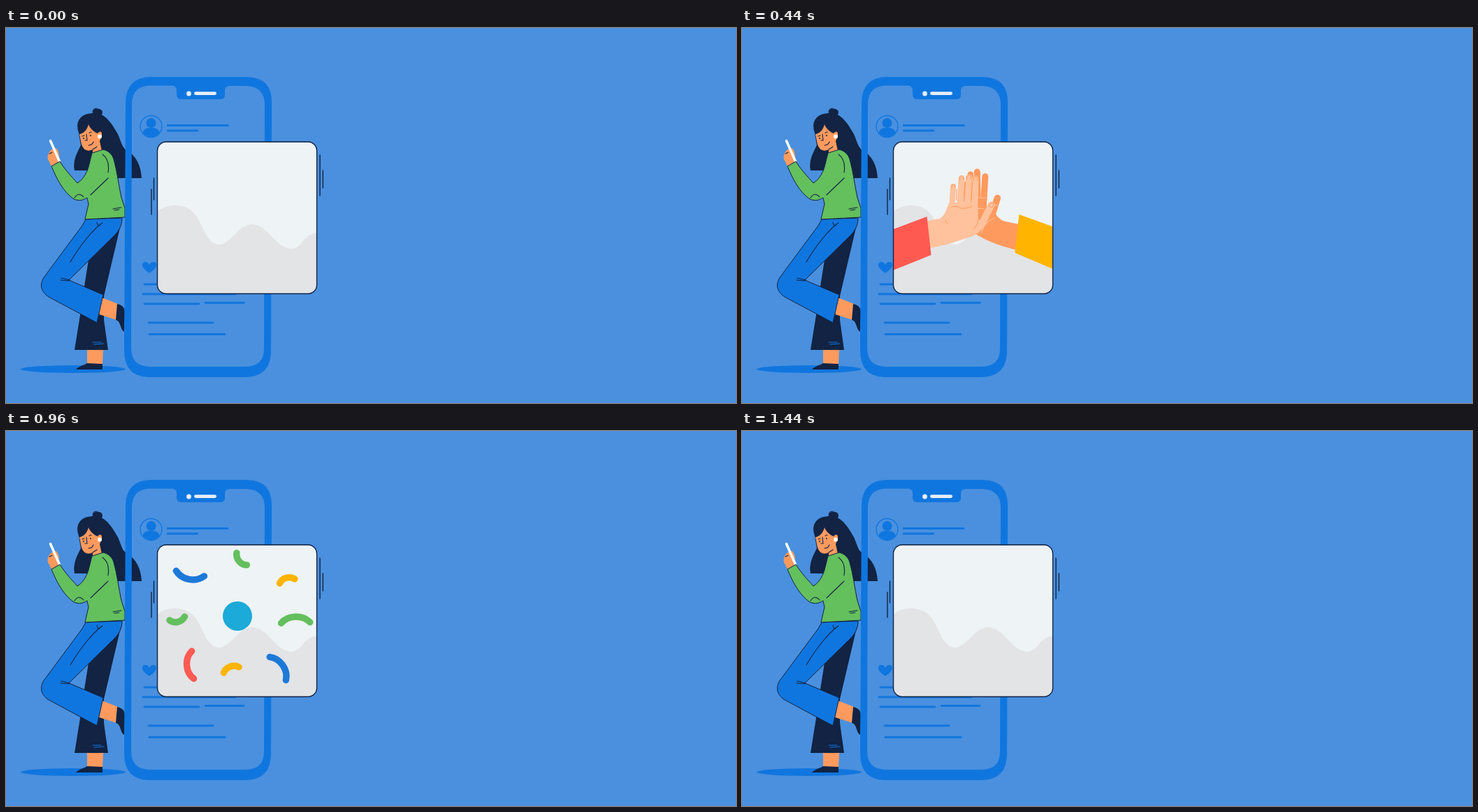
An HTML page that plays this animation: 1044x537 px, repeating every 1680 ms.

```html
<!DOCTYPE html>
<html lang="en">
<head>
<meta charset="utf-8">
<title>High five</title>
<style>
  html, body { margin: 0; height: 100%; overflow: hidden; background: #4a90de; }
  svg { display: block; }
  .navy { fill: #122343; }
  .blue { fill: #1076df; }
  .skin { fill: #ff9a5e; }
  .green { fill: #64bf5d; }
  .edge { stroke: #122343; stroke-width: 1; stroke-linejoin: round; }
  .line { fill: none; stroke: #122343; stroke-width: 1.1; stroke-linecap: round; }
  .text { fill: none; stroke: #1076df; stroke-width: 2.8; stroke-linecap: round; }
  .hand path, #confetti path { stroke-linecap: round; }
</style>
</head>
<body>
<svg width="1044" height="537" viewBox="0 0 1044 537">
  <defs>
    <clipPath id="inside"><rect x="217" y="163.5" width="227" height="217" rx="12"/></clipPath>
  </defs>

  <!-- woman -->
  <ellipse class="blue" cx="96" cy="488.5" rx="75" ry="5.5"/>
  <path class="navy" d="M104 150C98 132 108 122 126 122C142 121 152 138 160 152C165 163 165 169 172 175C187 183 193 198 194 215H155L150 204H98C95 190 102 178 107 168Z"/>
  <ellipse class="navy" cx="131" cy="121" rx="7" ry="5.500"/>
  <path class="line" d="M124 120Q125 115 130 115"/>
  <path class="skin" d="M105 152C107 160 107 166 110 171C114 177 120 176 124 174L124 180L137 176L134 162L137 154C138 148 134 147 131 151C126 149 120 144 118 138C116 146 111 151 105 152Z"/>
  <circle cx="134" cy="155.500" r="3" fill="#fff"/>
  <path class="line" d="M115 152L116 161L113 161M118 168Q123 168 125 163M109 155L112 154M119 150L122 149M124 174L130 170"/>
  <circle class="navy" cx="111" cy="158" r="1"/><circle class="navy" cx="121" cy="154" r="1"/>

  <path class="skin" d="M69 172C63 174 58 181 60 188L65 198L76 191C75 185 77 180 74 175C73 172 71 172 69 172Z"/>
  <path d="M63.500 161.500L76.500 191" stroke="#fff" stroke-width="3.500" stroke-linecap="round"/>
  <path class="line" d="M62 180L66 178"/>

  <path class="navy" d="M118 332L163 286L140 384V418L146 461H98L107 405L112 370Z"/>
  <path class="line" d="M124 450L136 450M126 453L140 452" style="stroke:#1076df"/>
  <path class="skin" d="M137 386L160 395L158 418L133 410ZM116 461H139L138 481H116Z"/>
  <path class="navy" d="M159 395C166 397 171 400 170 410L169 435C163 432 165 420 157 418ZM100 489C104 484 112 483 116 480L138 481V489Z"/>
  <path class="blue edge" d="M114 274L166 272C166 284 161 292 150 302L90 361L139 382L130 422L61 385C50 378 47 367 55 356L109 283Z"/>
  <path class="line" d="M138 279C127 286 108 308 92 335M130 278Q131 284 134 283M78 361L90 362M79 358L91 361"/>

  <path class="green edge" d="M123 179L139 174C147 176 152 181 154 188C159 205 161 225 165 243L170 258V271L113 274L118 252L116 243C110 247 104 248 97 245C82 235 72 215 65 198L77 191C85 204 94 213 102 222C111 217 117 205 119 195Z"/>
  <path class="line" d="M138 181C145 186 148 194 146 207M146 215L121 239M98 243Q104 234 111 242M153 259L165 257M155 261L162 260"/>

  <!-- phone -->
  <path class="blue" fill-rule="evenodd" d="M208 70H345Q380 71 380 106L379 464Q378 500 341 500H204Q169 499 169 462L171 106Q172 70 208 70ZM206 82.500Q180 83 180 110L179 458Q179 485 206 485H342Q369 485 369 459L370 110Q370 84 344 83H320Q313 83 313 90V96Q313 102 306 102H251Q244 102 244 95V89Q244 83 237 82.500Z"/>
  <g fill="#e6eef6">
    <circle cx="261.500" cy="94" r="3.400"/><rect x="269" y="91.300" width="32" height="4.600" rx="2.300"/>
  </g>
  <circle cx="207.500" cy="141" r="15.500" fill="none" stroke="#1076df" stroke-width="1.300"/>
  <circle class="blue" cx="207.500" cy="136" r="7"/>
  <path class="blue" d="M195 150Q197 144 204 143H211Q218 144 220 150Q208 162 195 150Z"/>
  <path class="blue" d="M205 351C191 342 194 335 199 335Q203 335 205 339Q207 335 211 335C216 335 219 342 205 351Z"/>
  <path class="text" d="M231 139.500H317M231 147H274M198 367H218M196 381H328M198 395H276M285 393.500H340M204 422H296M205 438.500H313"/>
  <path class="line" style="stroke-width:1.400" d="M449 182V240M453.300 204V229M208 231V267M211.500 215V246"/>

  <!-- card -->
  <g clip-path="url(#inside)">
    <rect x="216" y="163" width="229" height="218" fill="#eef3f5"/>
    <path fill="#e2e4e6" d="M216 263C225 256 233 254 242 254C256 254 268 261 275 274C284 291 290 310 305 310C322 310 332 281 352 281C374 281 386 316 408 316C425 316 424 294 445 294V381H216Z"/>
    <circle id="badge" r="21" fill="#1caad8"/>
    <g id="confetti" fill="none" stroke-width="9.400"></g>

    <g id="rightHand" class="hand">
      <g fill="none" stroke="#ff9a5e">
        <path stroke-width="8" d="M355 228L361 264"/>
        <path stroke-width="8.500" d="M364.500 214L368 260"/>
        <path stroke-width="9" d="M374 210.500L375 258"/>
        <path stroke-width="9" d="M385.500 217L383 260"/>
        <path stroke-width="9.500" d="M403 248L394 277"/>
      </g>
      <path class="skin" d="M356 250L388 248Q387 260 389 269L399 266Q401 276 412 281L455 290V328C425 322 396 314 376 302C359 292 354 280 356 250Z"/>
      <path fill="none" stroke="#ffc29c" stroke-width="1.100" d="M359 268Q368 262 383 263M361 252L367 251M370 247L385 248M380 298Q384 283 398 277M398 257L403 259"/>
    </g>
    <path id="rightSleeve" fill="#ffb400" d="M416 269L410 324L490 358V296Z"/>

    <g id="leftHand" class="hand">
      <g fill="none" stroke="#ffc29c">
        <path stroke-width="8" d="M261 236.500L259 268"/>
        <path stroke-width="9" d="M273 225L270.500 266"/>
        <path stroke-width="9.200" d="M283.500 223.500L281 266"/>
        <path stroke-width="9" d="M293 225.500L291.500 268"/>
        <path stroke-width="10" d="M315.500 263L302 290"/>
      </g>
      <path fill="#ffc29c" d="M255 260L296 258L297 284L308 288Q303 301 288 308L250 320L200 330V290L240 283C249 280 251 270 255 260Z"/>
      <path fill="none" stroke="#ff9a5e" stroke-width="1" d="M258 266Q264 263 270 267Q278 269 288 265M266 240L265.500 256M278.500 230L276 258M288.500 230L286.500 258M297 284Q296 292 290 297M250 285L253 290M259 238V235Q261 232 263.500 235V238M270.500 227V223Q273 219 276 223V227M281 226V222Q284 218 286.500 222V226M290.500 228V224Q293 220 296 224V228M312.500 264Q314 259 318 260Q320 262 317 266Z"/>
    </g>
    <path id="leftSleeve" fill="#ff5a52" d="M244 275L250 330L170 362V303Z"/>
  </g>
  <rect x="216.500" y="163" width="228" height="217.500" rx="12.500" fill="none" stroke="#122343" stroke-width="1.400"/>
</svg>
<script>
const LOOP = 1680, STEP = 40;
const BLUE = '#1d79d8', GREEN = '#64bf5d', AMBER = '#ffb400', RED = '#ff5a52';
const $ = id => document.getElementById(id);
const clamp = v => Math.max(0, Math.min(1, v));

// middle of the chord, half chord, bulge, angle, colour, start time
const pieces = [
  [263, 204, 20.4, 8.5, 5.7, BLUE, 600],
  [337, 183, 11.3, 5, 45, GREEN, 600],
  [402.5, 215, 11.2, -5, -21, AMBER, 600],
  [414.5, 274.5, 20.6, -8.5, -7, GREEN, 600],
  [244.5, 268.5, 11, 5, -18, GREEN, 680],
  [267, 334.5, 19.7, 8.5, 81, RED, 680],
  [322.5, 342, 11.6, -5, -25.5, AMBER, 680],
  [389, 340.5, 20.2, -8.5, 50, BLUE, 680]
].map(([x, y, half, bulge, angle, color, start]) => {
  const el = document.createElementNS('http://www.w3.org/2000/svg', 'path');
  // each arc turns and grows around a point inside its bulge
  const pivot = bulge * 0.6, c = bulge * 4 / 3 - pivot, rad = angle * Math.PI / 180;
  el.setAttribute('d', `M${-half} ${-pivot}C${-half / 2} ${c} ${half / 2} ${c} ${half} ${-pivot}`);
  el.setAttribute('stroke', color);
  $('confetti').append(el);
  return { el, x: x - pivot * Math.sin(rad), y: y + pivot * Math.cos(rad), angle, start };
});

// time, reach of the hands towards each other
const reachKeys = [[160, -104], [200, -81], [400, 38], [440, 41], [480, 39], [520, 29], [600, 0], [800, -74], [920, -110]];

function reachAt(t) {
  const i = reachKeys.findIndex(k => k[0] >= t);
  if (i < 1) return -110;
  const [t0, a] = reachKeys[i - 1], [t1, b] = reachKeys[i];
  return a + (b - a) * (t - t0) / (t1 - t0);
}

const place = (el, x, y, angle = 0, scale = 1) =>
  el.setAttribute('transform', `translate(${x} ${y}) rotate(${angle}) scale(${scale})`);

function draw(t) {
  const r = reachAt(t);
  place($('leftHand'), r, -r * 0.23);
  place($('leftSleeve'), r / 2, -r * 0.12);
  place($('rightHand'), -r * 0.92, -r * 0.11);
  place($('rightSleeve'), -r * 0.48, -r * 0.05);

  const out = 1 - clamp((t - 1320) / 120) ** 2;
  place($('badge'), 331, 265, 0, clamp((t - 480) / 195) * out);
  for (const p of pieces)
    place(p.el, p.x, p.y, p.angle - (t - 1160) * 0.025, clamp((t - p.start) / 180) * out);
}

const begin = performance.now();
function tick() {
  draw(Math.floor((performance.now() - begin) % LOOP / STEP) * STEP);
  requestAnimationFrame(tick);
}
tick();
</script>
</body>
</html>
```
